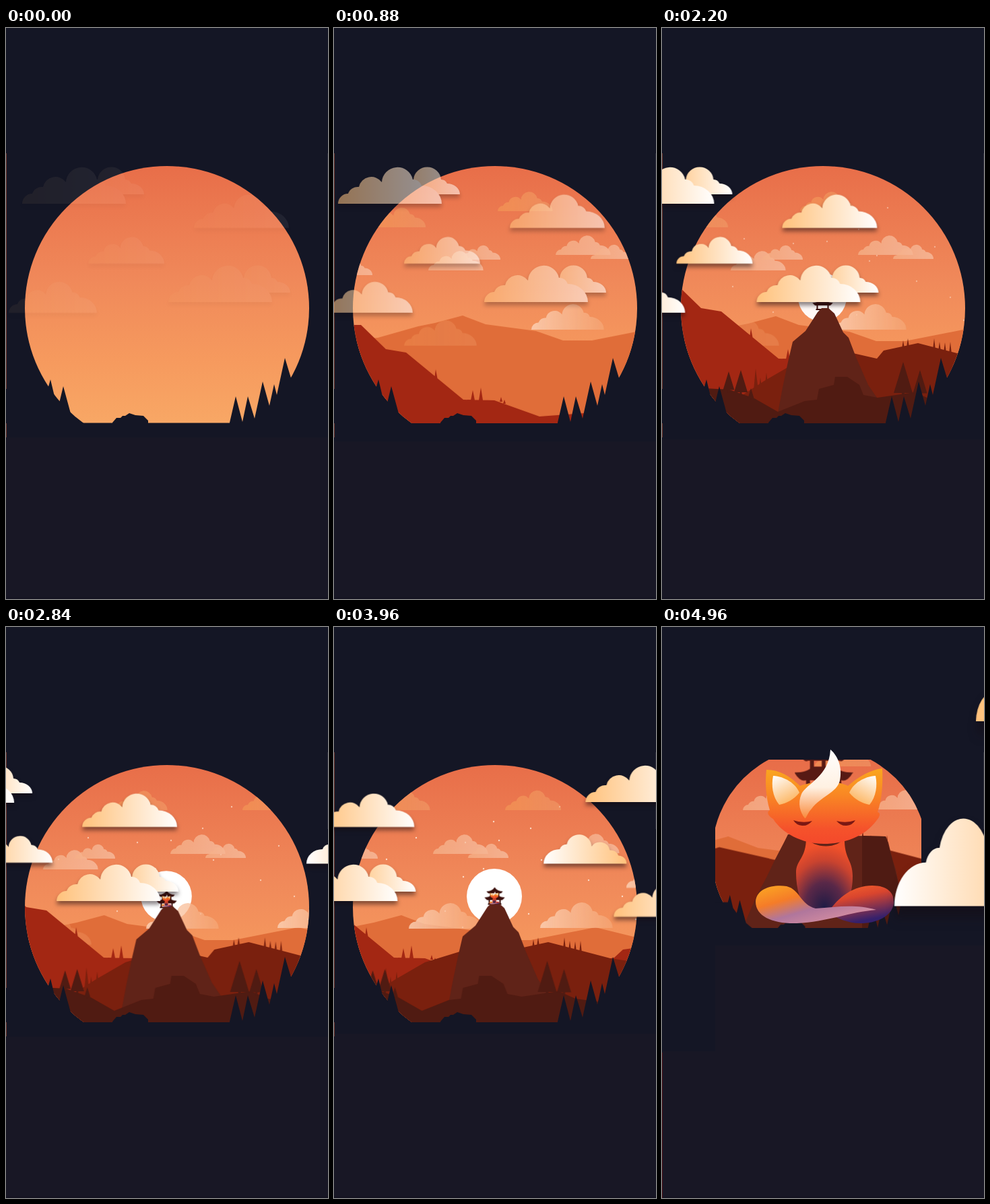
These frames come from a looping animation (478x848 px, 5000 ms). An HTML page without scripts:

```html
<!DOCTYPE html>
<html lang="en">
<head>
<meta charset="utf-8">
<title>Sunset mountain</title>
<style>
html, body { margin: 0; width: 100%; height: 100%; overflow: hidden; background: #181725; }
svg { display: block; width: 478px; height: 848px; }
.move { animation: 5s linear infinite both; }

#backdrop { animation-name: backdrop; }
#edge { animation-name: edge; }
#side { animation-name: side; }
#window { animation-name: window; }
#disc { animation-name: disc; }
#ridge { animation-name: ridge; }
#haze { animation-name: haze; }
#sun { animation-name: sun; }
#stars { animation-name: stars; }
#red { animation-name: red; }
#brown { animation-name: brown; }
#peak { animation-name: peak; }
#shade { animation-name: shade; }
#temple { animation-name: temple; }
#near { animation-name: near; }
#frame { animation-name: frame; }
#fox { animation-name: fox; }
#clouds { animation-name: clouds, appear; }

@keyframes backdrop {
  0% { height: 608px; }
  17.6% { height: 614px; }
  44% { height: 611px; }
  89.6% { height: 602px; animation-timing-function: ease-in; }
  99.2%, 100% { height: 473px; }
}
@keyframes edge {
  0%, 89.6% { y: 186px; height: 422px; fill: #70382f; }
  99.2%, 100% { y: 632px; height: 216px; fill: #4a1018; }
}
@keyframes side {
  0%, 89.6% { opacity: 0; }
  99.2%, 100% { opacity: 1; }
}
@keyframes window {
  0%, 89.6% { x: 0px; y: 186px; width: 478px; height: 400.5px; animation-timing-function: ease-in; }
  99.2%, 100% { x: 79px; y: 197px; width: 306px; height: 250px; }
}
@keyframes disc {
  0%, 89.6% { cx: 239px; cy: 416px; r: 211px; animation-timing-function: ease-in; }
  99.2%, 100% { cx: 234px; cy: 338px; r: 160px; }
}
@keyframes ridge {
  0% { transform: translateY(170px); }
  11.2% { transform: translateY(56px); }
  17.6% { transform: none; }
  29.6% { transform: translate(-5px, 1px); }
  44% { transform: translate(-22px, 1px); }
  68.8% { transform: translate(-67px, 1px); }
  89.6% { transform: translate(-115px, 1px) scale(1); animation-timing-function: ease-in; }
  99.2%, 100% { transform: translate(-150px, -244px) scale(1.3); }
}
@keyframes haze {
  0%, 11.2% { transform: translateX(4px); opacity: 0; }
  17.6% { transform: none; opacity: .9; }
  29.6% { transform: translateX(-10px); opacity: .9; }
  44% { transform: translateX(-38px); }
  68.8% { transform: translateX(-129px); }
  89.6% { transform: translateX(-235px); animation-timing-function: ease-in; }
  99.2%, 100% { transform: translate(-209px, -65px); opacity: .9; }
}
@keyframes sun {
  0%, 32% { r: 28px; opacity: 0; }
  44% { r: 36px; opacity: .95; }
  50% { opacity: 1; }
  68.8% { r: 39.5px; }
  89.6% { r: 42.5px; opacity: 1; }
  99.2%, 100% { r: 46px; opacity: 0; }
}
@keyframes stars {
  0%, 20% { opacity: 0; }
  29.6% { opacity: .8; }
  44% { opacity: .45; }
  68.8%, 89.6% { opacity: .85; }
  99.2%, 100% { opacity: 0; }
}
@keyframes red {
  0% { transform: translate(6px, 220px); }
  11.2% { transform: translate(4px, 125px); }
  17.6% { transform: translate(3px, 61px); }
  29.6% { transform: none; }
  44% { transform: translateX(-16px); }
  68.8% { transform: translateX(-70px); }
  89.6% { transform: translateX(-130px); animation-timing-function: ease-in; }
  99.2%, 100% { transform: translate(-200px, 60px); }
}
@keyframes brown {
  0%, 17.6% { transform: translateY(135px); }
  29.6% { transform: none; }
  44% { transform: translate(-8px, 4px); }
  68.8% { transform: translate(-46px, 4px); }
  89.6% { transform: translate(-94px, 4px) scale(1); animation-timing-function: ease-in; }
  99.2%, 100% { transform: translate(-320px, -384px) scale(1.5); }
}
@keyframes peak {
  0%, 26.5% { transform: translateY(215px); }
  29.6% { transform: translateY(164px); }
  44% { transform: translate(1px, 4px); }
  68.8% { transform: none; }
  89.6% {
    transform: translate(-4px, -5px);
    d: path("M165 600L178 530L186 492L193 462L212 446L230 418L236 412L246 412L255 420L268 448L276 456L287 485L305 526L320 548L330 600Z");
    animation-timing-function: ease-in;
  }
  99.2%, 100% {
    transform: none;
    d: path("M60 600L120 447L140 400L155 372L168 345L180 322L187 308L332 311L336 320L342 345L347 360L352 385L365 420L370 447L400 600Z");
  }
}
@keyframes shade {
  0%, 94% { opacity: 0; }
  99.2%, 100% { opacity: 1; }
}
@keyframes temple {
  0%, 26.5% { transform: translate(238.5px, 629px); fill: #5a1d15; }
  29.6% { transform: translate(238.5px, 578px); fill: #5a1d15; }
  44% { transform: translate(238.5px, 419px); fill: #3a0f0c; }
  68.8% { transform: translate(238.5px, 416px); }
  89.6% { transform: translate(238.5px, 409px) scale(1); fill: #3a0f0c; animation-timing-function: ease-in; }
  99.2%, 100% { transform: translate(240px, 248px) scale(2.9); fill: #571a14; }
}
@keyframes near {
  0%, 29.6% { transform: translate(8px, 95px); }
  44% { transform: none; }
  68.8% { transform: translateX(-22px); }
  89.6% { transform: translateX(-61px); animation-timing-function: ease-in; }
  99.2%, 100% { transform: translate(-80px, 60px); }
}
@keyframes frame {
  0%, 89.6% { transform: none; animation-timing-function: ease-in; }
  99.2%, 100% { transform: translate(50px, -4px) scale(.77); }
}
@keyframes fox {
  0%, 44% { transform: translate(-3px, -23px) scale(.07); opacity: 0; }
  55% { opacity: 1; }
  68.8% { transform: translate(-3px, -26px) scale(.07); }
  89.6% { transform: translate(-3px, -31px) scale(.075); animation-timing-function: ease-in; }
  99.2%, 100% { transform: none; opacity: 1; }
}
@keyframes clouds {
  0%, 11.2% { transform: translateX(18px); }
  17.6% { transform: none; }
  29.6% { transform: translateX(-43.5px); }
  44% { transform: translateX(-82.5px); }
  68.8% { transform: translateX(-209px); }
  89.6% { transform: translateX(-356px) scale(1); animation-timing-function: ease-in; }
  99.2%, 100% { transform: translate(-813px, -640px) scale(1.95, 3); }
}
@keyframes appear {
  0%, 11.2% { opacity: .06; }
  17.6% { opacity: .55; }
  24%, 100% { opacity: 1; }
}
#fox { transform-origin: 241px 440px; }
#clouds { filter: drop-shadow(0 5px 3px rgba(20, 10, 15, .5)); }
</style>
</head>
<body>
<svg viewBox="0 0 478 848">
  <defs>
    <linearGradient id="sky" gradientUnits="userSpaceOnUse" x1="0" y1="205" x2="0" y2="586">
      <stop stop-color="#e86e49"/><stop offset=".45" stop-color="#f0895a"/>
      <stop offset=".76" stop-color="#f69a5e"/><stop offset="1" stop-color="#f8a765"/>
    </linearGradient>
    <linearGradient id="cream"><stop stop-color="#ffc27c"/><stop offset="1" stop-color="#fff"/></linearGradient>
    <linearGradient id="mist">
      <stop stop-color="#f7b48c" stop-opacity=".8"/><stop offset="1" stop-color="#f8c3a8" stop-opacity=".8"/>
    </linearGradient>
    <linearGradient id="pale">
      <stop stop-color="#fbd3b9" stop-opacity=".9"/><stop offset="1" stop-color="#f5a878" stop-opacity=".75"/>
    </linearGradient>
    <linearGradient id="faint">
      <stop stop-color="#f39555" stop-opacity=".8"/><stop offset="1" stop-color="#f09a68" stop-opacity=".7"/>
    </linearGradient>
    <linearGradient id="fur" x2="0" y2="1">
      <stop stop-color="#faa71f"/><stop offset=".35" stop-color="#f98724"/>
      <stop offset=".8" stop-color="#f5522b"/><stop offset="1" stop-color="#f4492b"/>
    </linearGradient>
    <radialGradient id="chest" cy=".95" r=".85">
      <stop stop-color="#1f1b45"/><stop offset=".4" stop-color="#5a2848"/>
      <stop offset=".75" stop-color="#c9432f"/><stop offset="1" stop-color="#f2512a"/>
    </radialGradient>
    <linearGradient id="leg" x2=".35" y2="1">
      <stop stop-color="#f9652a"/><stop offset=".4" stop-color="#d9452e"/><stop offset="1" stop-color="#34206c"/>
    </linearGradient>
    <linearGradient id="tail" x2=".75" y2=".8">
      <stop stop-color="#fcaa22"/><stop offset=".4" stop-color="#f57c28"/>
      <stop offset=".7" stop-color="#b0769c"/><stop offset="1" stop-color="#cf8aa0"/>
    </linearGradient>
    <linearGradient id="ear" x2=".5" y2="1"><stop stop-color="#fff"/><stop offset="1" stop-color="#fcb765"/></linearGradient>
    <linearGradient id="tuft" x2="0" y2="1">
      <stop stop-color="#fff"/><stop offset=".55" stop-color="#fff1e2"/><stop offset="1" stop-color="#f98a3c"/>
    </linearGradient>

    <path id="puff" d="M0 0A15 15 0 0 1 15-15A15 15 0 0 1 31-25A19 19 0 0 1 65-32A23.300 23.300 0 0 1 111-36A13 13 0 0 1 124-27A30 27 0 0 1 154 0Z"/>
    <g id="double">
      <path d="M85-14L112-36A20.600 20.600 0 0 1 153-36A10 10 0 0 1 162-30A19 16 0 0 1 181-14Z"/>
      <use href="#puff"/>
    </g>
    <path id="tree" d="M-14 46L0 0 14 46H2v7h-4v-7z"/>
    <g id="half">
      <path fill="url(#ear)" d="M165 221C182 222 198 232 204 246C196 256 185 262 174 264C164 252 162 235 165 221Z"/>
      <path fill="#7c1813" d="M195 287Q209 292 223 288Q216 296 208 295Q199 294 195 287Z"/>
    </g>
    <clipPath id="discClip"><circle id="disc" class="move" cx="239" cy="416" r="211"/></clipPath>
    <clipPath id="windowClip"><rect id="window" class="move" y="186" width="478" height="400.5"/></clipPath>
  </defs>

  <rect width="478" height="848" fill="#181725"/>
  <rect id="backdrop" class="move" width="478" height="608" fill="#141625"/>
  <rect id="side" class="move" y="470" width="79" height="160" fill="#141625"/>
  <rect y="846" width="478" height="2" fill="#131220"/>
  <rect id="edge" class="move" y="186" width="1" height="422" fill="#70382f"/>
  <path d="M477.5 186V300" stroke="#343440" opacity=".7"/>

  <g clip-path="url(#windowClip)">
    <g clip-path="url(#discClip)">
      <rect y="150" width="478" height="500" fill="url(#sky)"/>
      <path id="stars" class="move" stroke="#ffe9d8" stroke-width="2.4" stroke-linecap="round" d="M237 289h0M195 320h0M245 317h0M292 299h0M335 267h0M405 325h0M105 384h0M222 359h0M192 371h0M378 376h0M428 400h0M165 422h0M238 429h0M308 346h0M78 345h0M122 313h0M289 426h0M319 338h0M448 434h0M191 446h0"/>
      <circle id="sun" class="move" cx="238" cy="400" r="36" fill="#fff"/>
      <path id="ridge" class="move" fill="#e06d39" d="M-60 700V470L65 460 125 443 150 438 191 427 225 440 300 450 340 464 383 464 479 445 560 465 620 470V700Z"/>
      <g id="haze" class="move" fill="url(#mist)">
        <g fill="url(#faint)">
          <use href="#puff" transform="translate(53 296)scale(.54)"/>
          <use href="#puff" transform="translate(243 272)scale(.53)"/>
          <use href="#puff" transform="translate(436 272)scale(.54)"/>
          <use href="#puff" transform="translate(104 472)scale(.7)" opacity=".55"/>
        </g>
        <use href="#puff" transform="translate(329 337)scale(.53)"/>
        <use href="#puff" transform="translate(381 343)scale(.39)"/>
        <use href="#puff" transform="translate(140 360)scale(.53)"/>
        <use href="#puff" transform="translate(187 344)scale(.39)"/>
        <use href="#puff" transform="translate(-3 367)scale(.39)"/>
        <use href="#puff" transform="translate(524 336)scale(.53)"/>
        <g fill="url(#pale)">
          <use href="#puff" transform="translate(293 448)scale(.7)"/>
          <use href="#puff" transform="translate(488 447)scale(.7)"/>
          <use href="#puff" transform="translate(616 387)scale(.68)"/>
        </g>
      </g>
      <path id="red" class="move" fill="#a32713" d="M-60 700V380H37L74 416 104 421 189 491 235 492 302 516 369 511 470 500 516 491 529 479 573 473 700 480V700ZM146 460l2-14 3 16zM200 492l3-15 3 15zM212 492l3-19 3 19zM243 494l2-7 2 7zM248 497l2-6 2 6z"/>
      <path id="brown" class="move" fill="#7a200e" d="M-20 700V580L95 562 160 520 205 494 270 474 327 487 337 475 388 464 442 478 480 488 560 500V700ZM144 534l3-32 4 32zM152 530l2-15 2 15zM161 524l2-16 2 16zM364 472l2-12 2 12zM371 470l2-13 2 13zM410 474l2-17 2 17zM418 476l2-14 2 14zM426 478l2-15 2 15zM434 480l2-18 2 18z"/>
      <g id="temple" class="move">
        <path d="M-12-20Q-4-20 0-26Q4-20 12-20Q10-16 8-17H-8Q-10-16-12-20ZM-15-11Q-8-11-6-14H6Q8-11 15-11Q12-6 9-7H-9Q-12-6-15-11ZM-9-7h2V0h-2zM7-7h2V0h-2zM-7-17h2v4h-2zM5-17h2v4h-2zM-1-17h2v4h-2zM-10-2H10V0H-10Z"/>
      </g>
      <path id="peak" class="move" fill="#602318" d="M165 600L178 530L186 492L193 462L212 446L230 418L236 412L246 412L255 420L268 448L276 456L287 485L305 526L320 548L330 600Z"/>
      <path id="shade" class="move" fill="#4f1b13" d="M297 310L332 311 342 345 352 385 370 447H297Z"/>
      <g id="near" class="move" fill="#501b12">
        <path d="M-40 640V540L62 535 100 537 137 550 172 570 212 554 230 552 233 536 255 530 257 518H275L293 530 299 545 320 549 375 541 400 552 460 560V640Z"/>
        <use href="#tree" x="358" y="496"/>
        <use href="#tree" transform="translate(383 508)scale(.75)"/>
        <use href="#tree" transform="translate(99 510)scale(.6)"/>
        <use href="#tree" transform="translate(117 508)scale(.72)"/>
        <use href="#tree" transform="translate(132 535)scale(.32)"/>
      </g>
    </g>
    <path id="frame" class="move" fill="#141625" d="M0 600V536H62L66 522 72 547 79 557 85 532 97 576 109 586V600ZM158 588V586L164 579H170L173 576H177L183 572 192 575 204 576 211 583V588ZM332 600V586L341 547 351 585 359 547 369 580 381 525 391 561 398 529 402 545 414 490 424 523H478V600Z"/>
  </g>

  <g id="fox" class="move">
    <path fill="url(#chest)" d="M214 312C225 330 262 330 271 312C270 345 283 345 283 370C283 395 276 410 268 422H214C206 408 199 390 199 365C199 345 214 345 214 312Z"/>
    <path fill="url(#leg)" d="M246 425C262 400 285 384 312 384C335 384 345 395 344 410C342 430 318 440 295 440C275 440 260 432 246 425Z"/>
    <path fill="url(#tail)" d="M139 408C140 388 165 382 185 385C205 390 205 412 228 418C260 416 285 411 318 420C280 423 245 438 200 440C165 441 139 430 139 408Z"/>
    <path fill="url(#fur)" d="M155 212C175 212 190 222 205 236C225 228 262 228 276 236C292 222 310 212 327 210C328 230 327 255 320 275C325 276 324 281 318 288C300 312 270 322 240 322C208 322 178 306 165 285C157 280 155 275 160 272C154 252 153 230 155 212Z"/>
    <use href="#half"/>
    <use href="#half" transform="translate(482)scale(-1 1)"/>
    <path fill="url(#tuft)" d="M250 182C262 192 268 210 264 228C260 246 235 252 222 270C216 276 214 285 212 284C205 275 201 262 207 248C215 232 248 222 250 182Z"/>
  </g>

  <g id="clouds" class="move" fill="url(#cream)">
    <use href="#double" x="6" y="261"/>
    <use href="#puff" transform="translate(261 297)scale(.915)"/>
    <use href="#puff" transform="translate(104 350)scale(.734)"/>
    <use href="#puff" transform="translate(-14 423)scale(.85)"/>
    <use href="#double" x="223" y="407"/>
    <use href="#puff" x="656" y="260"/>
    <use href="#puff" transform="translate(778 340)scale(.7)"/>
    <use href="#puff" transform="translate(821 352)scale(.7)"/>
    <use href="#puff" transform="translate(717 351.500)scale(-.8 .8)"/>
    <use href="#puff" transform="translate(698 430)scale(.88)"/>
  </g>
</svg>
</body>
</html>
```
